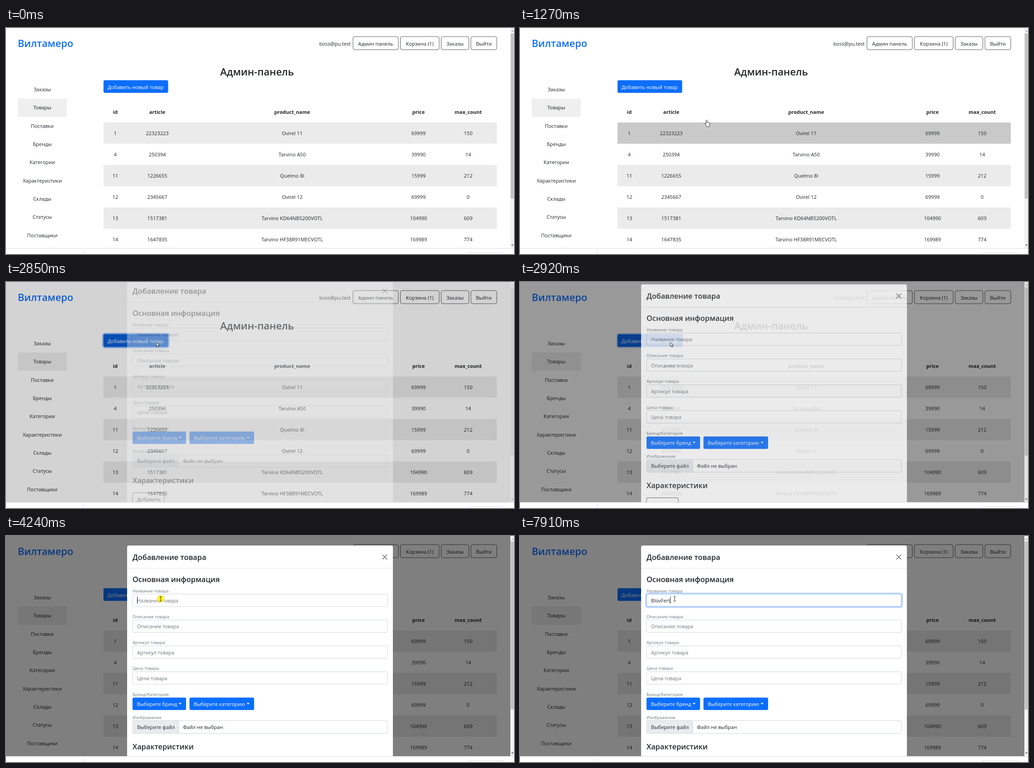
Write an HTML page that moves like this. It is 1120 px wide and 500 px high and loops after 8 s.

```html
<!DOCTYPE html>
<html lang="ru">
<head>
<meta charset="utf-8">
<title>Админ-панель</title>
<style>
html, body { margin: 0; width: 100%; height: 100%; overflow: hidden; background: #fff; }
svg { display: block; width: 100vw; height: 100vh; }
text { font: 11px "Open Sans", "Noto Sans", sans-serif; fill: #212529; white-space: pre; }
.mid { text-anchor: middle; }
.end { text-anchor: end; }
.bold { font-weight: 700; }
.logo { font-size: 21.7px; font-weight: 600; fill: #0d6efd; }
.h1 { font-size: 22.1px; font-weight: 600; }
.h2 { font-size: 16.3px; font-weight: 600; }
.label { font-size: 9.5px; fill: #6c757d; }
.hint { font-size: 10.9px; fill: #6c757d; }
.white { fill: #fff; }
.blue { fill: #0d6efd; }
.outline { fill: none; stroke: #343a40; stroke-width: .85; }
.field { fill: #fff; stroke: #ced4da; }
.pointer { fill: #fff; stroke: #222; stroke-width: .9; stroke-linejoin: round; }
</style>
</head>
<body>
<svg id="stage" viewBox="0 0 1120 500" xmlns="http://www.w3.org/2000/svg"></svg>
<script>
const text = (x, y, s, cls = '', id = '') => `<text ${id && `id="${id}"`} x="${x}" y="${y}" class="${cls}">${s}</text>`;
const rect = (x, y, w, h, attrs = '', r = 0) => `<rect x="${x}" y="${y}" width="${w}" height="${h}" rx="${r}" ${attrs}/>`;
const path = (d, attrs) => `<path d="${d}" ${attrs}/>`;

const ROW_TOP = 209, ROW_H = 47, STRIPE = '#ebebeb', HOVER = '#c9c9c9';
const columns = [241, 333.5, 631, 909.5, 1019];
const heads = ['id', 'article', 'product_name', 'price', 'max_count'];
const goods = [
  [1, 22323223, 'Ovirel 11', 69999, 150],
  [4, 250394, 'Tarvino A50', 39990, 14],
  [11, 1226655, 'Quelmo 8I', 15999, 212],
  [12, 2345667, 'Ovirel 12', 69999, 0],
  [13, 1517381, 'Tarvino KD64NB5200VOTL', 104990, 609],
  [14, 1647835, 'Tarvino HF38R91MECVOTL', 169989, 774]
];
const menu = ['Заказы', 'Товары', 'Поставки', 'Бренды', 'Категории',
  'Характеристики', 'Склады', 'Статусы', 'Поставщики'];
const topButtons = [
  [765, 100, 'Админ панель'], [869.5, 85.5, 'Корзина (1)'],
  [959.5, 61, 'Заказы'], [1025, 57, 'Выйти']
];
const fields = ['Название товара', 'Описание товара', 'Артикул товара', 'Цена товара'];

const cells = (row, y, cls) => row.map((s, i) => text(columns[i], y, s, cls)).join('');

const scrollbar = (id, bottom) => `<g id="${id}">` +
  rect(1112, 0, 8, 487, 'fill="#f1f1f1"') +
  rect(1112.7, 12, 7, bottom - 12, 'fill="#c1c1c1"') +
  path('M1114 8h5l-2.5-3z', 'fill="#a3a3a3"') +
  path('M1114 479h5l-2.5 3z', 'fill="#505050"') + '</g>';

const page = () =>
  text(26, 42, 'Вилтамеро', 'logo') +
  text(760, 38.5, 'boss@pu.test', 'end') +
  topButtons.map(([x, w, s]) =>
    rect(x, 19, w, 29, 'class="outline"', 4) + text(x + w / 2, 38.5, s, 'mid')).join('') +
  text(553.5, 105, 'Админ-панель', 'h1 mid') +
  rect(26, 156, 108, 40.5, 'fill="#efefef"') +
  menu.map((s, i) => text(80, 140 + i * 40.35, s, 'mid')).join('') +
  rect(213.5, 114, 145.5, 31, 'id="addRing" fill="none" stroke="#3184fd" stroke-width="3"', 5) +
  rect(215, 115.5, 142.5, 28, 'class="blue"', 3) +
  rect(215, 115.5, 142.5, 28, 'id="addHover" fill="#0b5ed7"', 3) +
  text(224, 134.5, 'Добавить новый товар', 'white') +
  cells(heads, 190, 'mid bold') +
  goods.map((row, i) =>
    rect(215, ROW_TOP + i * ROW_H, 867, ROW_H, `id="row${i}"`) +
    cells(row, 237 + i * ROW_H, 'mid')).join('') +
  scrollbar('pageBar', 377.5);

const dropdown = (x, w, s) =>
  rect(x, 357.5, w, 27.5, 'class="blue"', 3) + text(x + 9.5, 375.5, s, 'white') +
  path(`M${x + w - 16.5} 369.5h6.6l-3.3 3.3z`, 'fill="#fff"');

const dialog = () =>
  rect(267, 21, 586, 620, 'fill="#fff"', 4) +
  path('M267 71.5H853', 'stroke="#dee2e6"') +
  text(279, 53, 'Добавление товара', 'h2') +
  path('M829.8 41.3l10.6 10.6m0-10.6l-10.6 10.6', 'stroke="#777" stroke-width="1.6"') +
  text(279, 101.5, 'Основная информация', 'h2') +
  fields.map((s, i) => {
    const y = i * 57.3;
    return text(279, 124.5 + y, s, 'label') +
      rect(279, 128.5 + y, 562, 27.5, 'class="field"', 3) +
      text(289, 147 + y, s, 'hint', 'hint' + i);
  }).join('') +
  '<g id="focus" fill="none">' +
  rect(277.2, 126.7, 565.6, 31.1, 'stroke="#0d6efd" stroke-opacity=".25" stroke-width="3"', 5) +
  rect(279, 128.5, 562, 27.5, 'stroke="#86b7fe"', 3) + '</g>' +
  text(289, 147, '', '', 'typed') +
  rect(289, 134, 1, 16, 'id="caret" fill="#222"') +
  text(279, 353.5, 'Бренд/Категория', 'label') +
  dropdown(279, 118, 'Выберите бренд') +
  dropdown(404.5, 142.5, 'Выберите категорию') +
  text(279, 404.5, 'Изображение', 'label') +
  rect(279, 408.5, 562, 28, 'class="field"', 3) +
  rect(279.5, 409, 101, 27, 'fill="#e9ecef"', 2) +
  path('M380.5 409v27', 'stroke="#ced4da"') +
  text(289, 427, 'Выберите файл') +
  text(390, 427, 'Файл не выбран') +
  text(279, 472, 'Характеристики', 'h2') +
  rect(279, 493, 70, 28, 'class="outline"', 3) +
  text(289, 511.5, 'Добавить');

const downloads = () =>
  rect(0, 487, 1120, 13, 'fill="#fff"') +
  path('M0 487.5H1120M170.5 492v8', 'stroke="#d9d9d9"') +
  rect(1019.5, 496.5, 78, 20, 'fill="none" stroke="#dadce0"', 4);

const cursor = () =>
  '<circle id="click" r="8" fill="#ffee10"/>' +
  path('M0 0V9.6L2.2 7.7L3.7 11.1L5.2 10.4L3.7 7.1H6.7Z', 'id="arrow" class="pointer"') +
  path('M-1 1.2Q-1 0 .2 0T1.4 1.2V5.5Q3 4.8 3.6 5.9Q5 5.3 5.6 6.4Q7.2 6 7.2 7.6V10.5Q7 12.5 6 13.5V14.8H.3V13.6Q-1.5 11.5-3.2 8.6Q-3.4 7.2-2.2 7.4L-1 8.8Z', 'id="hand" class="pointer"') +
  path('M-2.5-5H-.6L0-4.5L.6-5H2.5M0-4.5V4.5M-2.5 5H-.6L0 4.5L.6 5H2.5', 'id="beam" fill="none" stroke="#222"');

const $ = id => document.getElementById(id);
$('stage').innerHTML = page() +
  rect(0, 0, 1120, 487, 'id="shade"') +
  `<g id="modal"><g id="dialog">${dialog()}</g>${scrollbar('modalBar', 384)}</g>` +
  downloads() + `<g id="cursor">${cursor()}</g>`;

const LOOP = 8000, STEP = 68;
const PRESS = 2580, OPEN = 2800, BEAM = 3520, FOCUS = 4240;
const bursts = [320, 930, 1760, PRESS, BEAM, FOCUS];
const track = [
  [0, 440, 520], [252, 440, 520], [600, 420, 285], [862, 420, 285],
  [1270, 411.3, 203.5], [1690, 357, 161], [2180, 331.5, 133],
  [3460, 331.5, 133], [3715, 341, 139], [LOOP, 341, 139]
];
const typing = [
  [0, ''], [5310, 'B'], [5450, 'BL'], [5850, 'BLO'], [6330, 'BL'], [6400, 'B'],
  [6860, 'Bl'], [7060, 'Blo'], [7190, 'Blov'], [7450, 'BlovF'],
  [7650, 'BlovFe'], [7780, 'BlovFer'], [7910, 'BlovFert']
];

const clamp = v => Math.max(0, Math.min(1, v));
const ramp = (t, start, len) => clamp((t - start) / len);
const set = (id, name, v) => $(id).setAttribute(name, v);
const show = (id, amount) => set(id, 'opacity', +amount);

// The screen advances in steps counted from the start of each burst.
function quantize(t) {
  const start = bursts.filter(b => b <= t).pop() ?? 0;
  return start + Math.floor((t - start + 4) / STEP) * STEP;
}

function cursorAt(t) {
  const i = Math.max(1, track.findIndex(k => k[0] > t));
  const [t0, x0, y0] = track[i - 1], [t1, x1, y1] = track[i];
  const p = ramp(t, t0, t1 - t0);
  return [x0 + (x1 - x0) * p, y0 + (y1 - y0) * p];
}

function clickGlow(t) {
  const age = t - (t >= FOCUS ? FOCUS : PRESS);
  return age < 0 ? 0 : .85 * (1 - clamp(age / 200));
}

function render(time) {
  const t = quantize(time);
  const [x, y] = cursorAt(t);
  const opened = t >= OPEN;

  const hovered = opened ? -1 : Math.floor((y + 6 - ROW_TOP) / ROW_H);
  goods.forEach((_, i) =>
    set('row' + i, 'fill', i === hovered ? HOVER : i % 2 ? '#fff' : STRIPE));
  const onRow = hovered >= 0 && hovered < goods.length;
  const onAdd = !opened && y < 144 && x < 358;
  const leave = 1 - ramp(t, 2860, 120);
  show('addHover', ramp(t, 1960, 150) * leave);
  show('addRing', .5 * ramp(t, PRESS - 70, 150) * leave);

  const fade = ramp(t, OPEN, 150);
  const slide = 1 - (1 - ramp(t, OPEN, 300)) ** 1.65;
  show('shade', fade * .5);
  show('modal', fade);
  set('dialog', 'transform', `translate(0 ${-36.5 * (1 - slide)})`);
  show('pageBar', !opened);

  const value = typing.filter(k => k[0] <= time).pop()[1];
  $('typed').textContent = value;
  show('hint0', !value);
  set('caret', 'x', 289 + (value ? $('typed').getComputedTextLength() : 0));
  show('caret', time >= FOCUS && !(time >= 4780 && time < 5310));
  show('focus', ramp(t, FOCUS, 150));

  const beam = t >= BEAM, hand = !beam && (onRow || onAdd);
  set('cursor', 'transform', `translate(${x} ${y})`);
  show('beam', beam);
  show('hand', hand);
  show('arrow', !beam && !hand);
  show('click', clickGlow(t));
}

function tick(now) {
  render(now % LOOP);
  requestAnimationFrame(tick);
}
render(0);
requestAnimationFrame(tick);
</script>
</body>
</html>
```
